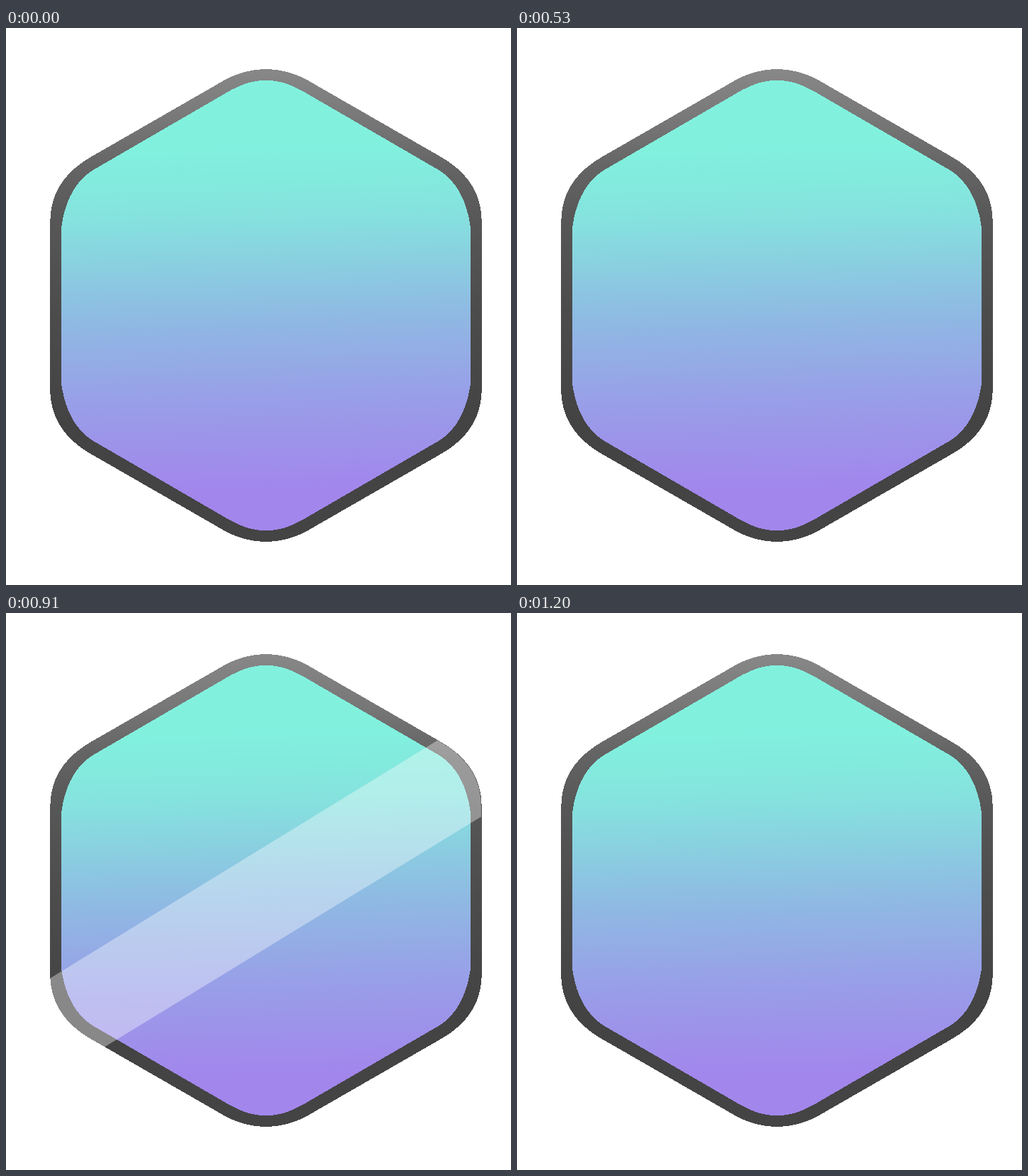
An HTML page for the animation above (1.24 s loop, 712x786 px).

```html
<!DOCTYPE html>
<html lang="en">
<head>
<meta charset="utf-8">
<title>Hexagon shine</title>
<style>
  html, body { margin: 0; width: 100%; height: 100%; overflow: hidden; background: #fff; }
  svg { display: block; }
</style>
</head>
<body>
<svg width="712" height="786" viewBox="0 0 712 786">
  <defs>
    <linearGradient id="rimFill" gradientUnits="userSpaceOnUse" x1="0" y1="58" x2="0" y2="725">
      <stop offset="0" stop-color="#888"/>
      <stop offset=".11" stop-color="#777"/>
      <stop offset=".21" stop-color="#646464"/>
      <stop offset=".32" stop-color="#575757"/>
      <stop offset=".51" stop-color="#4c4c4c"/>
      <stop offset=".75" stop-color="#434343"/>
      <stop offset="1" stop-color="#444"/>
    </linearGradient>
    <linearGradient id="faceFill" gradientUnits="userSpaceOnUse" x1="360" y1="168" x2="372" y2="652">
      <stop offset="0" stop-color="#81f1de"/>
      <stop offset=".2" stop-color="#85e2de"/>
      <stop offset=".5" stop-color="#8fb9e3"/>
      <stop offset=".75" stop-color="#999de8"/>
      <stop offset="1" stop-color="#a286ec"/>
    </linearGradient>
    <linearGradient id="glintFill" gradientUnits="userSpaceOnUse" x1="0" y1="0" x2="0" y2="183">
      <stop offset="0" stop-color="#ccc" stop-opacity="0"/>
      <stop offset=".16" stop-color="#ccc"/>
      <stop offset=".84" stop-color="#bebebe"/>
      <stop offset="1" stop-color="#bebebe" stop-opacity="0"/>
    </linearGradient>
    <clipPath id="hexClip"><path id="clipShape" transform="translate(-.8 0)"/></clipPath>
  </defs>
  <path id="rim" fill="url(#rimFill)" shape-rendering="crispEdges"/>
  <path id="face" fill="url(#faceFill)" shape-rendering="crispEdges"/>
  <path id="glint" fill="url(#glintFill)" fill-rule="evenodd" stroke="url(#glintFill)" stroke-width="1.4" transform="translate(-1 .5)"/>
  <g clip-path="url(#hexClip)"><path id="sheen" fill="#fff" fill-opacity=".365"/></g>
</svg>
<script>
const $ = id => document.getElementById(id);
const CX = 366.5, CY = 391.5;

// Rounded hexagon mirrored on both axes; points are offsets in the upper right quarter.
function hex([topX, topY], peakY, [sideX, sideY], [bendX, bendY], [edgeX, edgeY]) {
  const p = (x, y) => `${CX + x} ${CY + y} `;
  return 'M' + p(-topX, topY) + 'Q' + p(0, peakY) + p(topX, topY) +
    'L' + p(sideX, sideY) + 'Q' + p(bendX, bendY) + p(edgeX, edgeY) +
    'L' + p(edgeX, -edgeY) + 'Q' + p(bendX, -bendY) + p(sideX, -sideY) +
    'L' + p(topX, -topY) + 'Q' + p(0, -peakY) + p(-topX, -topY) +
    'L' + p(-sideX, -sideY) + 'Q' + p(-bendX, -bendY) + p(-edgeX, -edgeY) +
    'L' + p(-edgeX, edgeY) + 'Q' + p(-bendX, bendY) + p(-sideX, sideY) + 'Z';
}

const outer = hex([54, -320.5], -346.5, [246, -210], [304.2, -177], [304.2, -118]);
const inner = hex([50, -303.5], -332, [245.5, -190], [281, -166], [288.5, -110]);
$('rim').setAttribute('d', outer);
$('face').setAttribute('d', inner);
$('clipShape').setAttribute('d', outer);
$('glint').setAttribute('d', outer + inner);

const LOOP = 1240;
// The glint crosses the rim diagonally, turning a little flatter with each step.
const glint = (start, n) => ({ start, glint: { y: 189.5 * n - 40.5, angle: 35 - 2.35 * n } });
// Sheen edges: heights at the left and right sides, upper then lower, and an upward bow.
const sheen = (start, upper, lower, bow = 0) => ({ start, upper, lower, bow });
const steps = [
  { start: 0 },
  ...[80, 160, 240, 370, 450].map(glint),
  { start: 530 },
  sheen(700, [173, -200], [317, -51], 6),
  sheen(830, [345, -28], [488, 119]),
  sheen(910, [515, 142.5], [659, 288]),
  sheen(1040, [671.6, 315], [814, 460]),
  sheen(1120, [829, 487], [969, 632]),
  { start: 1200 }
];

function bandPath({ upper: [ul, ur], lower: [ll, lr], bow }) {
  const midX = 254, midY = ll + (lr - ll) * (midX - 63) / 606 - bow;
  return `M63 ${ul}L669 ${ur}L680 ${ur}V${lr}H669Q${midX} ${midY} 63 ${ll}H50V${ul}Z`;
}

function draw(time) {
  const step = steps.findLast(s => s.start <= time);
  $('glint').setAttribute('opacity', step.glint ? 1 : 0);
  if (step.glint) {
    const { y, angle } = step.glint;
    $('glintFill').setAttribute('gradientTransform', `translate(${CX} ${y}) skewY(${-angle})`);
  }
  $('sheen').setAttribute('d', step.upper ? bandPath(step) : '');
}

const origin = performance.now();
function tick() {
  draw((performance.now() - origin) % LOOP);
  requestAnimationFrame(tick);
}
tick();
</script>
</body>
</html>
```
